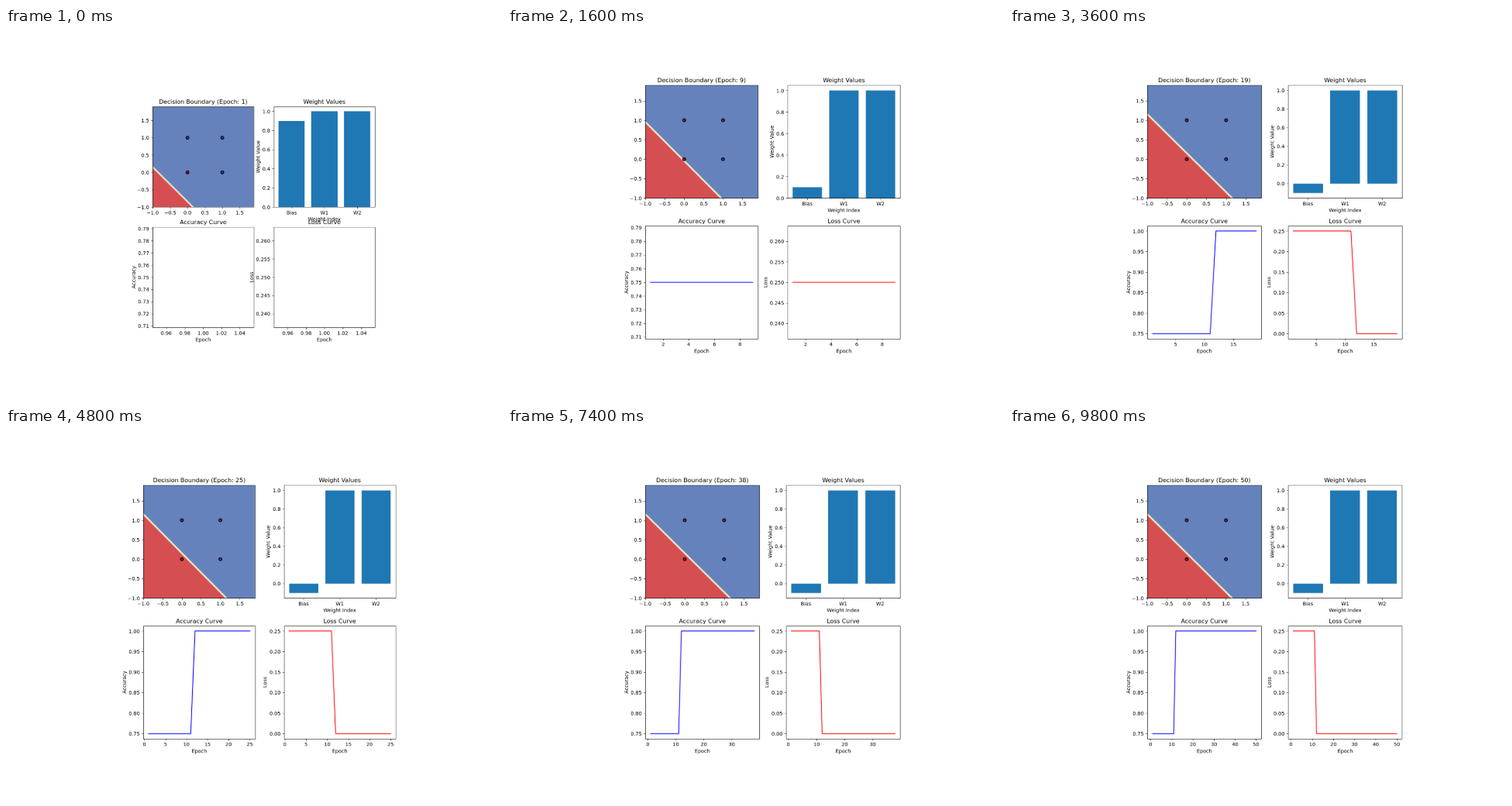
Animation of 640x480 px, one loop 10 s. Source, as an HTML page with a canvas:

```html
<!DOCTYPE html>
<html lang="en">
<head>
<meta charset="utf-8">
<title>Perceptron training</title>
<style>
  html, body { margin: 0; width: 100%; height: 100%; overflow: hidden; background: #fff; }
  canvas { display: block; }
</style>
</head>
<body>
<canvas id="stage" width="640" height="480"></canvas>
<script>
const EPOCHS = 50, EPOCH_MS = 200;
const SIZE = 800, PT = 100 / 72;            // figure side in px, px per point
const SMALL = 10 * PT, LARGE = 12 * PT;     // font sizes
const ASCENT = 11, DESCENT = 2, LINE_HEIGHT = ASCENT + DESCENT, TITLE_ASCENT = 13;
const TICK = 3.5 * PT, TICK_GAP = 7 * PT, LABEL_GAP = 4 * PT, TITLE_GAP = 6 * PT;
const FIGURE_PAD = 10.8 * PT;
const GRID_STEP = 0.1, LEVEL_STEP = 0.15;
// contour bands from class 0 to class 1
const BANDS = ['rgb(212,78,82)', 'rgb(247,146,108)', 'rgb(254,213,150)', 'rgb(255,255,204)',
  'rgb(212,236,244)', 'rgb(150,194,221)', 'rgb(102,130,188)'];

const stage = document.getElementById('stage').getContext('2d');
const figure = document.createElement('canvas');
figure.width = figure.height = SIZE;
const ctx = figure.getContext('2d');

const setFont = size => { ctx.font = `${size}px "DejaVu Sans", sans-serif`; };
const textWidth = text => { setFont(SMALL); return ctx.measureText(text).width; };
const crisp = v => Math.round(v) + 0.5;

function drawText(text, x, y, align = 'center', size = SMALL, angle = 0) {
  setFont(size);
  ctx.fillStyle = '#000';
  ctx.textAlign = align;
  ctx.save();
  ctx.translate(Math.round(x), Math.round(y));
  ctx.rotate(angle);
  ctx.fillText(text, 0, 0);
  ctx.restore();
}

function withMargin(lo, hi) {
  if (lo === hi) { lo *= 0.95; hi *= 1.05; }
  const margin = (hi - lo) * 0.05;
  return [lo - margin, hi + margin];
}

function niceTicks([lo, hi], bins) {
  const raw = (hi - lo) / bins;
  const power = 10 ** Math.floor(Math.log10(raw));
  const step = power * [1, 2, 2.5, 5, 10].find(m => m * power >= raw);
  let digits = 0;
  while (Math.abs(step * 10 ** digits - Math.round(step * 10 ** digits)) > 1e-6) digits++;
  const ticks = [];
  for (let k = Math.ceil(lo / step - 1e-9); k * step <= hi + step * 1e-9; k++) {
    const value = k * step + 0;
    ticks.push({ value, label: value.toFixed(digits).replace('-', '\u2212') });
  }
  return ticks;
}

// Training state
const biasAt = epoch => 1 - Math.min(epoch, 11) / 10;
const accuracyAt = epoch => epoch < 12 ? 0.75 : 1;
const lossAt = epoch => 1 - accuracyAt(epoch);

function drawBoundary(bias) {
  return (X, Y, box) => {
    ctx.fillStyle = BANDS[6];
    ctx.fillRect(box.x, box.y, box.w, box.h);
    for (let k = 5; k >= 0; k--) {
      const reach = 1 - bias + GRID_STEP * LEVEL_STEP * (k + 1);
      ctx.fillStyle = BANDS[k];
      ctx.beginPath();
      ctx.moveTo(X(-1), Y(-1));
      ctx.lineTo(X(reach), Y(-1));
      ctx.lineTo(X(-1), Y(reach));
      ctx.fill();
    }
    ctx.strokeStyle = '#000';
    ctx.lineWidth = 1.5 * PT;
    for (const [x, y] of [[0, 0], [0, 1], [1, 0], [1, 1]]) {
      ctx.fillStyle = x || y ? '#313695' : '#a50026';
      ctx.beginPath();
      ctx.arc(X(x), Y(y), 3 * PT, 0, 2 * Math.PI);
      ctx.fill();
      ctx.stroke();
    }
  };
}

function drawBars(weights) {
  return (X, Y) => {
    ctx.fillStyle = '#1f77b4';
    weights.forEach((weight, i) => {
      const left = Math.round(X(i - 0.4)), right = Math.round(X(i + 0.4));
      const base = Math.round(Y(0)), end = Math.round(Y(weight));
      ctx.fillRect(left, base, right - left, end - base);
    });
  };
}

function drawCurve(valueAt, epoch, color) {
  return (X, Y) => {
    if (epoch === 1) return;
    ctx.strokeStyle = color;
    ctx.lineWidth = 1.5 * PT;
    ctx.lineCap = 'square';
    ctx.lineJoin = 'round';
    ctx.beginPath();
    for (let e = 1; e <= epoch; e++) ctx.lineTo(X(e), Y(valueAt(e)));
    ctx.stroke();
    ctx.lineCap = 'butt';
    ctx.lineJoin = 'miter';
  };
}

function curvePanel(name, valueAt, epoch, color, col) {
  const ends = [valueAt(1), valueAt(epoch)];
  return {
    col, row: 1, title: name + ' Curve', xLabel: 'Epoch', yLabel: name,
    x: withMargin(1, epoch),
    y: withMargin(Math.min(...ends), Math.max(...ends)),
    plot: drawCurve(valueAt, epoch, color)
  };
}

function panelsAt(epoch) {
  const bias = biasAt(epoch);
  const panels = [
    { col: 0, row: 0, title: `Decision Boundary (Epoch: ${epoch})`,
      x: [-1, 1.9], y: [-1, 1.9], plot: drawBoundary(bias) },
    { col: 1, row: 0, title: 'Weight Values', xLabel: 'Weight Index', yLabel: 'Weight Value',
      x: withMargin(-0.4, 2.4),
      y: bias < 0 ? withMargin(bias, 1) : [0, 1.05],
      xTicks: ['Bias', 'W1', 'W2'].map((label, value) => ({ value, label })),
      plot: drawBars([bias, 1, 1]) },
    curvePanel('Accuracy', accuracyAt, epoch, '#00f', 0),
    curvePanel('Loss', lossAt, epoch, '#f00', 1)
  ];
  for (const panel of panels) {
    panel.xTicks ??= niceTicks(panel.x, 7);
    panel.yTicks = niceTicks(panel.y, 9);
    panel.tickWidth = Math.max(...panel.yTicks.map(t => textWidth(t.label)));
  }
  return panels;
}

// Layout: outer edges, panel size and gaps between panels
const firstLayout = {
  left: 100, top: 96,
  w: SIZE * 0.775 / 2.2, h: SIZE * 0.77 / 2.2,
  gapX: SIZE * 0.775 / 11, gapY: SIZE * 0.77 / 11
};

function tightLayout(panels, layout) {
  const leftOf = p => TICK_GAP + p.tickWidth + (p.yLabel ? LABEL_GAP + LINE_HEIGHT : 0);
  const overhang = p => Math.max(0, ...p.xTicks.map(t =>
    textWidth(t.label) / 2 - (p.x[1] - t.value) / (p.x[1] - p.x[0]) * layout.w));
  const [boundary, bars, accuracy, loss] = panels;
  const left = Math.max(leftOf(boundary), leftOf(accuracy)) + FIGURE_PAD;
  const right = Math.max(overhang(bars), overhang(loss)) + FIGURE_PAD;
  const gapX = FIGURE_PAD + Math.max(overhang(boundary) + leftOf(bars),
                                     overhang(accuracy) + leftOf(loss));
  const above = TITLE_GAP + TITLE_ASCENT;
  const below = TICK_GAP + LABEL_GAP + 2 * LINE_HEIGHT;
  const top = above + FIGURE_PAD, bottom = below + FIGURE_PAD;
  const gapY = above + below + FIGURE_PAD;
  return { left, top, gapX, gapY,
    w: (SIZE - left - right - gapX) / 2, h: (SIZE - top - bottom - gapY) / 2 };
}

function drawPanel(panel, layout) {
  const { w, h } = layout;
  const x = layout.left + panel.col * (w + layout.gapX);
  const y = layout.top + panel.row * (h + layout.gapY);
  const bottom = y + h, middleX = x + w / 2;
  const X = v => x + (v - panel.x[0]) / (panel.x[1] - panel.x[0]) * w;
  const Y = v => bottom - (v - panel.y[0]) / (panel.y[1] - panel.y[0]) * h;

  ctx.fillStyle = '#fff';
  ctx.fillRect(x, y, w, h);
  panel.plot(X, Y, { x, y, w, h });

  ctx.strokeStyle = '#000';
  ctx.lineWidth = 0.8 * PT;
  ctx.beginPath();
  ctx.rect(crisp(x), crisp(y), crisp(x + w) - crisp(x), crisp(bottom) - crisp(y));
  for (const { value, label } of panel.xTicks) {
    const tx = X(value);
    ctx.moveTo(crisp(tx), crisp(bottom));
    ctx.lineTo(crisp(tx), crisp(bottom) + TICK);
    drawText(label, tx, bottom + TICK_GAP + ASCENT);
  }
  for (const { value, label } of panel.yTicks) {
    const ty = Y(value);
    ctx.moveTo(crisp(x), crisp(ty));
    ctx.lineTo(crisp(x) - TICK, crisp(ty));
    drawText(label, x - TICK_GAP, ty + ASCENT / 2, 'right');
  }
  ctx.stroke();

  drawText(panel.title, middleX, y - TITLE_GAP, 'center', LARGE);
  if (panel.xLabel) {
    drawText(panel.xLabel, middleX, bottom + TICK_GAP + LINE_HEIGHT + LABEL_GAP + ASCENT);
  }
  if (panel.yLabel) {
    drawText(panel.yLabel, x - TICK_GAP - panel.tickWidth - LABEL_GAP - DESCENT, y + h / 2,
      'center', SMALL, -Math.PI / 2);
  }
}

// Each epoch is drawn with the layout fitted to the epoch before it.
const scenes = [];
let layout = firstLayout;
for (let epoch = 1; epoch <= EPOCHS; epoch++) {
  const panels = panelsAt(epoch);
  scenes.push({ panels, layout });
  layout = tightLayout(panels, layout);
}

let shown = -1;
function render(now) {
  const index = Math.floor(now / EPOCH_MS) % EPOCHS;
  if (index !== shown) {
    shown = index;
    ctx.fillStyle = '#fff';
    ctx.fillRect(0, 0, SIZE, SIZE);
    const scene = scenes[index];
    scene.panels.forEach(panel => drawPanel(panel, scene.layout));
    stage.fillStyle = '#fff';
    stage.fillRect(0, 0, 640, 480);
    stage.imageSmoothingQuality = 'high';
    stage.drawImage(figure, 143, 57, 370, 370);
  }
  requestAnimationFrame(() => render(performance.now()));
}
render(performance.now());
</script>
</body>
</html>
```
